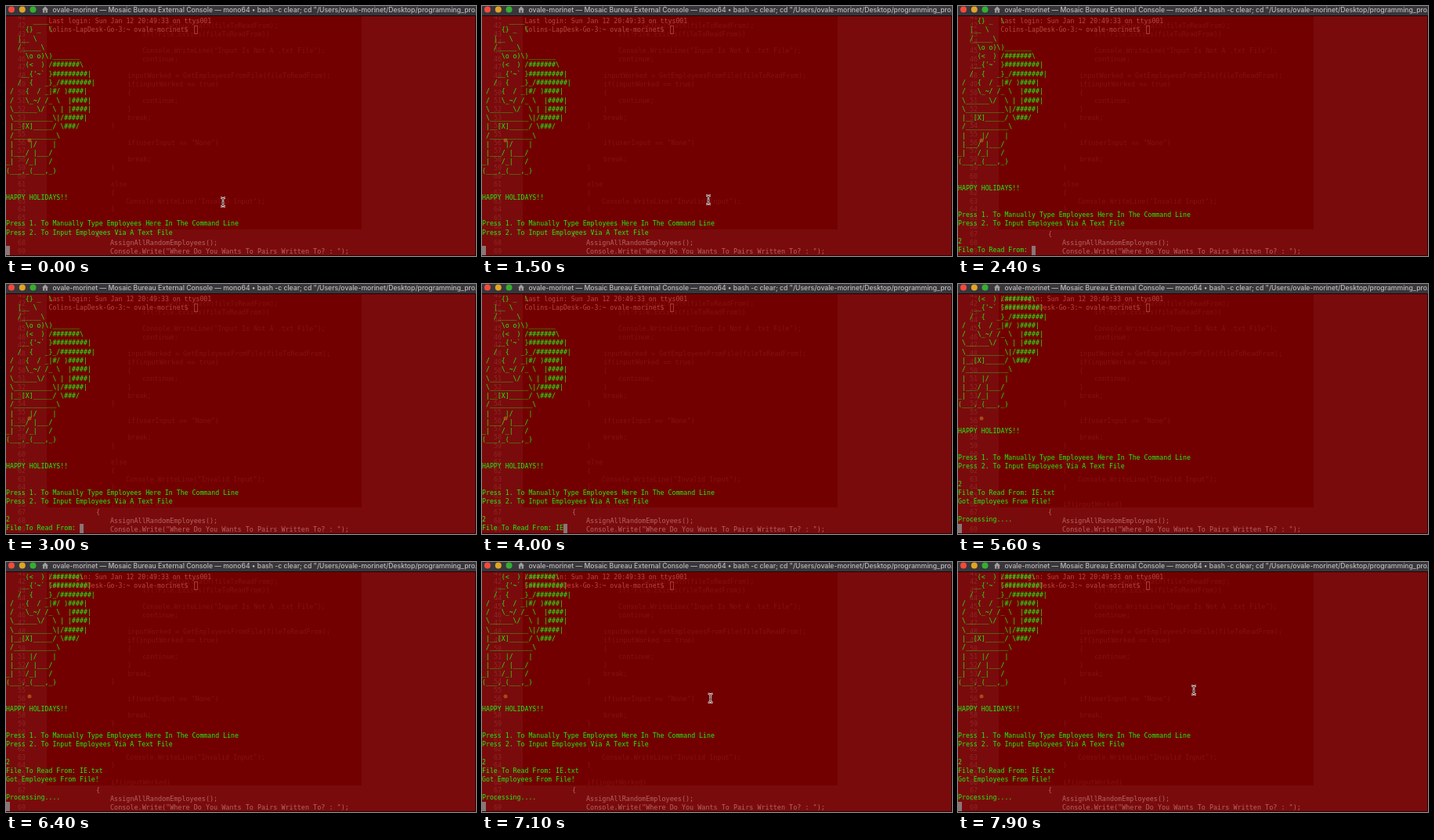
These frames come from a looping animation (600 px wide and 320 px high, 8 s). An HTML page:

```html
<!DOCTYPE html>
<html lang="en">
<head>
<meta charset="utf-8">
<title>Terminal</title>
<style>
  html, body { margin: 0; width: 100%; height: 100%; overflow: hidden; background: #7a0b0c; }
  svg { display: block; width: 600px; height: 320px; }
  text { white-space: pre; font: 8.22px "DejaVu Sans Mono", "Liberation Mono", monospace; }
  #title text { font: 500 8.65px Inter, "DejaVu Sans", sans-serif; fill: #bcbabb; }
  #code text { font-size: 8.45px; fill: #851111; }
  #code .near { fill: #b56464; }
  #code .num { fill: #8e2626; }
  #login text { fill: #b8483f; }
  #rows text { fill: #20ee18; }
</style>
</head>
<body>
<svg viewBox="0 0 600 320">
  <defs>
    <path id="ibeam" d="M-3 -5.5Q0 -5.5 0 -3.5Q0 -5.5 3 -5.5M0 -3.5V3.5M-3 5.5Q0 5.5 0 3.5Q0 5.5 3 5.5M-1.5 1H1.5" fill="none"/>
  </defs>
  <rect width="600" height="320" fill="#7a0b0c"/>
  <rect x="52" y="12" width="402" height="274" fill="#720000"/>
  <circle cx="30" cy="172" r="2.5" fill="#a8481a"/>
  <g id="code"></g>
  <g id="login"></g>
  <rect x="240.5" y="25.5" width="4" height="10" fill="none" stroke="#b0483f" stroke-width=".8"/>
  <rect id="block" y="307" width="5" height="12" fill="#8a7676"/>
  <g id="rows"></g>
  <path d="M599.5 12V319.5H0" fill="none" stroke="#260608"/>
  <g id="beam">
    <use href="#ibeam" stroke="#f4eaea" stroke-width="2.4"/>
    <use href="#ibeam" stroke="#2a1212" stroke-width=".8"/>
  </g>
  <g id="title">
    <rect width="600" height="12" fill="#38363a"/>
    <rect y="12" width="600" height="1" fill="#1c0608"/>
    <circle cx="7" cy="4.5" r="4" fill="#f4493c"/>
    <circle cx="20.8" cy="4.5" r="4" fill="#dfa526"/>
    <circle cx="34.5" cy="4.5" r="4" fill="#35ae33"/>
    <path d="M46 4.5L50 .5L54 4.5H53V8.5H47V4.5Z" fill="#a09d9e"/>
    <path d="M49 8.5V5.5H51V8.5" fill="#5b5759"/>
    <text x="59.5" y="8">ovale-morinet — Mosaic Bureau External Console — mono64 • bash -c clear; cd "/Users/ovale-morinet/Desktop/programming_pro…</text>
  </g>
</svg>
<script type="text/plain" id="art">
       ____
     {} _  \
   |__ \
   /_____\
     \o o)\)_______
     (<  ) /#######\
    __{'~` }#########|
   /  {   _}_/########|
 /   {  / _|#/ )####|
 /   \_~/ /_ \  |####|
 \______\/  \ | |####|
 \__________\|/#####|
 |__[X]_____/ \###/
 /___________\
 |    |/    |
 |___/ |___/
_|   /_|   /
(___,_(___,_)
</script>
<script>
const NS = 'http://www.w3.org/2000/svg';
const LOOP = 8000, ROWS = 27, COL = 4.95, PITCH = 11.28;
const $ = id => document.getElementById(id);

function addText(parent, x, y, str = '', cls = '') {
  const el = document.createElementNS(NS, 'text');
  el.setAttribute('x', x);
  el.setAttribute('y', y);
  if (cls) el.setAttribute('class', cls);
  el.textContent = str;
  parent.appendChild(el);
  return el;
}

// Editor showing through the terminal: line number, x, text
const codeY = n => 60 + 10.7 * (n - 45);
for (let n = 41; n < 70; n++) addText($('code'), 15, codeY(n), n, 'num');
[
  [42, 205, 'GetFullPath(fileToReadFrom);'],
  [43, 174, 'if(!File.Exists(fileToReadFrom))'],
  [45, 174, 'Console.WriteLine("Input Is Not A .txt File");'],
  [46, 174, 'continue;'],
  [48, 155, 'inputWorked = GetEmployeesFromFile(fileToReadFrom);'],
  [49, 155, 'if(inputWorked == true)'],
  [50, 155, '{'],
  [51, 174, 'continue;'],
  [52, 155, '}'],
  [53, 155, 'break;'],
  [54, 134, '}'],
  [56, 155, 'if(userInput == "None")'],
  [58, 155, 'break;'],
  [59, 134, '}'],
  [61, 134, 'else'],
  [62, 134, '{'],
  [63, 153, 'Console.WriteLine("Invalid Input");'],
  [64, 134, '}'],
  [66, 134, 'if(inputWorked)'],
  [67, 115, '{', 'near'],
  [68, 133, 'AssignAllRandomEmployees();', 'near'],
  [69, 133, 'Console.Write("Where Do You Wants To Pairs Written To? : ");', 'near']
].forEach(([n, x, str, cls]) => addText($('code'), x, codeY(n), str, cls));

const rowY = i => 22 + PITCH * i;
const rows = Array.from({ length: ROWS }, (_, i) => addText($('rows'), 0, rowY(i)));

// Second terminal window, behind this one
[
  'Last login: Sun Jan 12 20:49:33 on ttys001',
  'Colins-LapDesk-Go-3:~ ovale-morinet$'
].forEach((str, i) => addText($('login'), 11 * COL, rowY(i), str));

const greeting = [
  ...$('art').textContent.slice(1, -1).split('\n'),
  '', '', 'HAPPY HOLIDAYS!!', '', '',
  'Press 1. To Manually Type Employees Here In The Command Line',
  'Press 2. To Input Employees Via A Text File', ''
];
const PICK = 1600, ENTER = 2300, DONE = 5600;
const FILE = 'IE.txt', KEYS = [3400, 3800, 4200, 4500, 4700, 5000];

function screenAt(t) {
  const out = [...greeting, t < PICK ? '' : '2'];
  if (t >= ENTER) out.push('File To Read From: ' + FILE.slice(0, KEYS.filter(k => t >= k).length));
  if (t >= DONE) out.push('Got Employees From File!', '', 'Processing....', '');
  return out.slice(-ROWS);
}

// Pointer glides from a to b between on and end, hidden after off
const glides = [
  { on: 0, end: 600, off: PICK, a: [277, 251], b: [289, 248] },
  { on: 7000, end: 7700, off: LOOP, a: [290, 176], b: [301, 164] }
];

function movePointer(t) {
  const g = glides.find(g => t >= g.on && t < g.off);
  $('beam').style.display = g ? '' : 'none';
  if (!g) return;
  const p = Math.min(1, (t - g.on) / (g.end - g.on));
  const [x, y] = g.a.map((v, i) => v + (g.b[i] - v) * p);
  $('beam').setAttribute('transform', `translate(${x} ${y})`);
}

function render(t) {
  const lines = screenAt(t);
  rows.forEach((el, i) => { if (el.textContent !== lines[i]) el.textContent = lines[i]; });
  $('block').setAttribute('x', lines[ROWS - 1].length * COL);
  movePointer(t);
}

const start = performance.now();
function tick(now) {
  render(Math.max(0, now - start) % LOOP);
  requestAnimationFrame(tick);
}
render(0);
requestAnimationFrame(tick);
</script>
</body>
</html>
```
